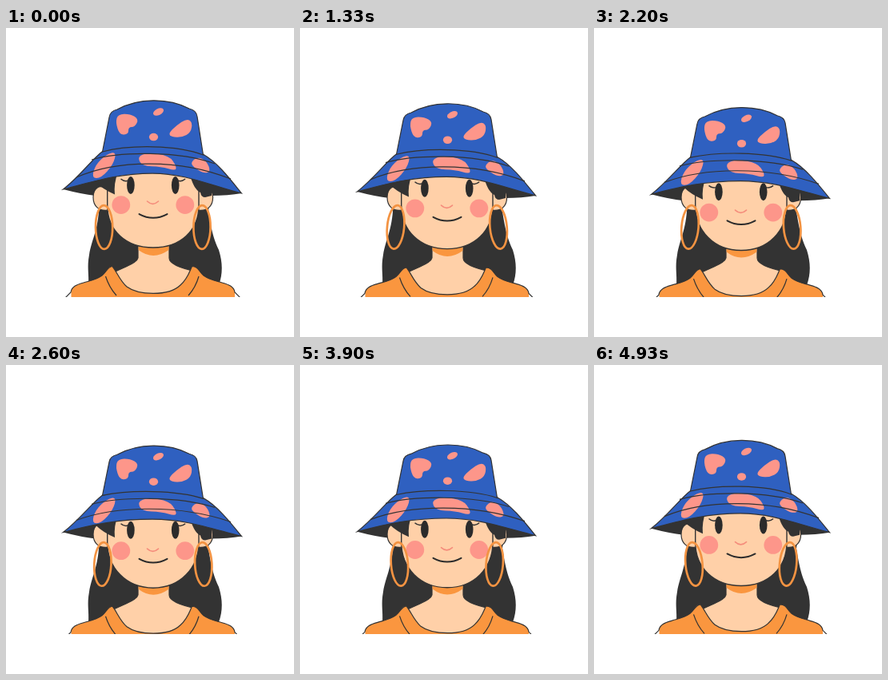
Write an HTML page with a canvas that moves like this. It is 360 px wide and 387 px high and loops after 5000 ms.

```html
<!DOCTYPE html>
<html lang="en">
<head>
<meta charset="utf-8">
<title>Girl in a bucket hat</title>
<style>
html, body { margin: 0; width: 100%; height: 100%; overflow: hidden; background: #fff; }
canvas { display: block; width: 360px; height: 387px; }
</style>
</head>
<body>
<canvas width="360" height="387"></canvas>
<script>
const ctx = document.querySelector('canvas').getContext('2d');
const DARK = '#333', SKIN = '#ffd0a8', BLUE = '#2f60c0', PINK = '#fd968a', ORANGE = '#fa963f';
const LOOP = 5000, SWAY = 6000, AXIS = 183.8;

function shape(d, fill, stroke, width = 1.2) {
  const path = new Path2D(d);
  if (fill) { ctx.fillStyle = fill; ctx.fill(path); }
  if (stroke) { ctx.strokeStyle = stroke; ctx.lineWidth = width; ctx.stroke(path); }
}

function oval(x, y, rx, ry, fill, stroke, width = 1.2, angle = 0) {
  ctx.beginPath();
  ctx.ellipse(x, y, rx, ry, angle, 0, 7);
  if (fill) { ctx.fillStyle = fill; ctx.fill(); }
  if (stroke) { ctx.strokeStyle = stroke; ctx.lineWidth = width; ctx.stroke(); }
}

function shifted(dy, draw) {
  ctx.save();
  ctx.translate(0, dy);
  draw();
  ctx.restore();
}

function clipped(x, y, w, h, draw) {
  ctx.save();
  ctx.beginPath();
  ctx.rect(x, y, w, h);
  ctx.clip();
  draw();
  ctx.restore();
}

// Runs draw once as is and once reflected about the face axis.
function mirrored(draw) {
  draw();
  ctx.save();
  ctx.translate(2 * AXIS, 0);
  ctx.scale(-1, 1);
  draw();
  ctx.restore();
}

// Smooth closed blob through the midpoints of its corner points.
function blob(...p) {
  const mid = (a, b) => `${(a[0] + b[0]) / 2} ${(a[1] + b[1]) / 2}`;
  const last = p[p.length - 1];
  shape(`M${mid(last, p[0])}` + p.map((q, i) =>
    `Q${q} ${mid(q, p[(i + 1) % p.length])}`).join(''), PINK);
}

function hairAndNeck(u) {
  shape('M113 200L116 230C114 255 107 266 104 284C101 300 104 308 103 322L170 330H205L266 322' +
    'C271 308 271 294 266 278C260 265 257 255 253 230L256 200Z', DARK);
  shape('M165 262V288Q164 293 150 299L130 308L145 345H224L238 305Q204 298 204 288V262Z', SKIN, DARK);
  shifted(3 * u, () => shape('M165.6 262V278Q184 292 203.4 278V262Z', ORANGE));
}

function shirt(u) {
  const outline = 'M74 338L81 331C82 324 88 321.5 97 319C107 316 113 315 120 310C126 305 127 299 133 298.5' +
    'C139 306 142 316 151 324C165 334.5 203 336.5 218 322C227 314 229 306 232.5 298.5' +
    'C241 299 241 305 247 310C254 315 260 316 270 319C279 321.5 285 324 286 331L293 338';
  shifted(4 * u, () => {
    clipped(81.5, 280, 204.5, 70, () => shape(outline + 'V350H74Z', ORANGE));
    shape(outline, null, DARK);
    shape('M124.5 311Q129 325 138 335M241 311Q237 325 228 335', null, DARK);
  });
}

function face(u, lid) {
  mirrored(() => shape('M127 202C116 194 109 202 109 212C109 223 116 230 128 228Z', SKIN, DARK));
  const chin = 275 + 4.5 * u;
  shape(`M126.7 180V222C126.7 254 150 ${chin} 184 ${chin}S241 254 241 222V180Z`, SKIN, DARK, 1.4);
  mirrored(() => {
    oval(143.8, 221.5 + 12 * u, 11.4, 11.4, PINK);
    const eye = 197 + 10.5 * u;
    oval(155.9 - lid, eye + lid, 4.8 + 1.5 * lid, 11 - 8.4 * lid, '#2b2b2b');
    shape(`M143.5 ${eye - 8 + 5.5 * lid}Q148 ${eye - 4 + 4.5 * lid} ${153 + 9 * lid} ${eye - 6 + 7 * lid}`,
      null, DARK, 1.5);
  });
  ctx.lineCap = 'round';
  shifted(14 * u, () => shape('M176.5 217Q183.5 223.5 190.5 217', null, '#f58d7c', 1.6));
  shifted(10.5 * u, () => shape('M166.5 233Q184 242.5 201.5 233', null, '#2b2b2b', 2));
  ctx.lineCap = 'butt';
}

function fringe(u) {
  shifted(8 * u, () => {
    shape('M112 193Q121 202 136 208.5Q134.5 195 140 180H116Z', DARK);
    shape('M229 180Q234 202 243 206Q244 212 249 212L257 210L258 190Z', DARK);
  });
}

function underside(u) {
  shifted(8 * u, () => shape('M71.5 202Q94 208 112 210L130 180H240L256 210Q278 210 294.5 207L183 168Z', DARK));
}

function hat(u) {
  const side = 8 * u, base = 9 * u, front = 12 * u, top = 11 * u;
  shape(`M120 ${155 + base}C108 ${164 + base} 91 ${187 + side} 71.5 ${202 + side}
    C110 ${192 + side} 140 ${182 + front} 183 ${182 + front}
    C224 ${182 + front} 255 ${197 + side} 294.5 ${207 + side}
    C280 ${189 + side} 264 ${168 + base} 247 ${158.5 + base}
    C214 ${142 + top} 154 ${142 + top} 120 ${155 + base}Z`, BLUE, DARK);
  shifted(11 * u, () => {
    blob([138, 155], [134, 171], [119, 188], [107, 188], [112, 171], [126, 158]);
    blob([164, 161], [178, 156], [204, 160], [213, 173], [212, 179], [194, 173.5], [170, 173]);
    blob([231, 168], [240, 161], [251, 167], [256, 180], [247, 182], [234, 174]);
  });
  shape(`M107 ${165 + 10 * u}C142 ${154.5 + top} 216 ${153.5 + top} 261 ${170 + 9 * u}
    M88 ${187 + side}C138 ${164.5 + front} 218 ${163.5 + front} 281 ${189 + side}`, null, DARK);
  shape(`M120.5 ${155 + base}L129 ${112 + 10 * u}Q130 ${104 + top} 139 ${102 + top}
    C165 ${87.5 + top} 203 ${87 + top} 229 ${101 + top}Q238 ${103 + top} 239 ${111 + 10 * u}
    L246.5 ${159 + base}C214 ${146 + top} 154 ${146 + top} 120.5 ${155 + base}Z`, BLUE, DARK);
  shifted(10.4 * u, () => {
    blob([137, 118], [140, 108], [155, 107.5], [166, 114], [161, 124], [153, 124], [153, 133], [142, 134]);
    blob([203, 132], [213, 122], [226, 113.5], [233, 118], [231, 131], [220, 137], [207, 136.5]);
    oval(190.5, 105, 7, 4, PINK, null, 0, -0.45);
    oval(184.5, 136.5, 5.6, 4.8, PINK);
  });
}

function earrings(swing) {
  mirrored(() => {
    ctx.save();
    ctx.translate(122.3, 221);
    ctx.rotate(swing * 0.1);
    oval(0, 28.5, 10.6, 27.3, null, '#f39342', 2.7);
    ctx.restore();
  });
}

function render(t) {
  const phase = (t - 100) / SWAY * 2 * Math.PI;
  const u = (1 - Math.cos(phase)) / 2;
  const lid = Math.max(0, 1 - Math.abs(t - 3330) / 150);
  ctx.clearRect(0, 0, 360, 387);
  clipped(0, 0, 360, 337, () => {
    hairAndNeck(u);
    underside(u);
    face(u, lid);
    fringe(u);
    hat(u);
    shirt(u);
    earrings(Math.sin(phase));
  });
}

const start = performance.now();
function tick() {
  const t = (performance.now() - start) % LOOP;
  // Poses hold for 30 and 70 ms in turn.
  render(Math.floor(t / 100) * 100 + (t % 100 < 30 ? 0 : 30));
  requestAnimationFrame(tick);
}
tick();
</script>
</body>
</html>
```
